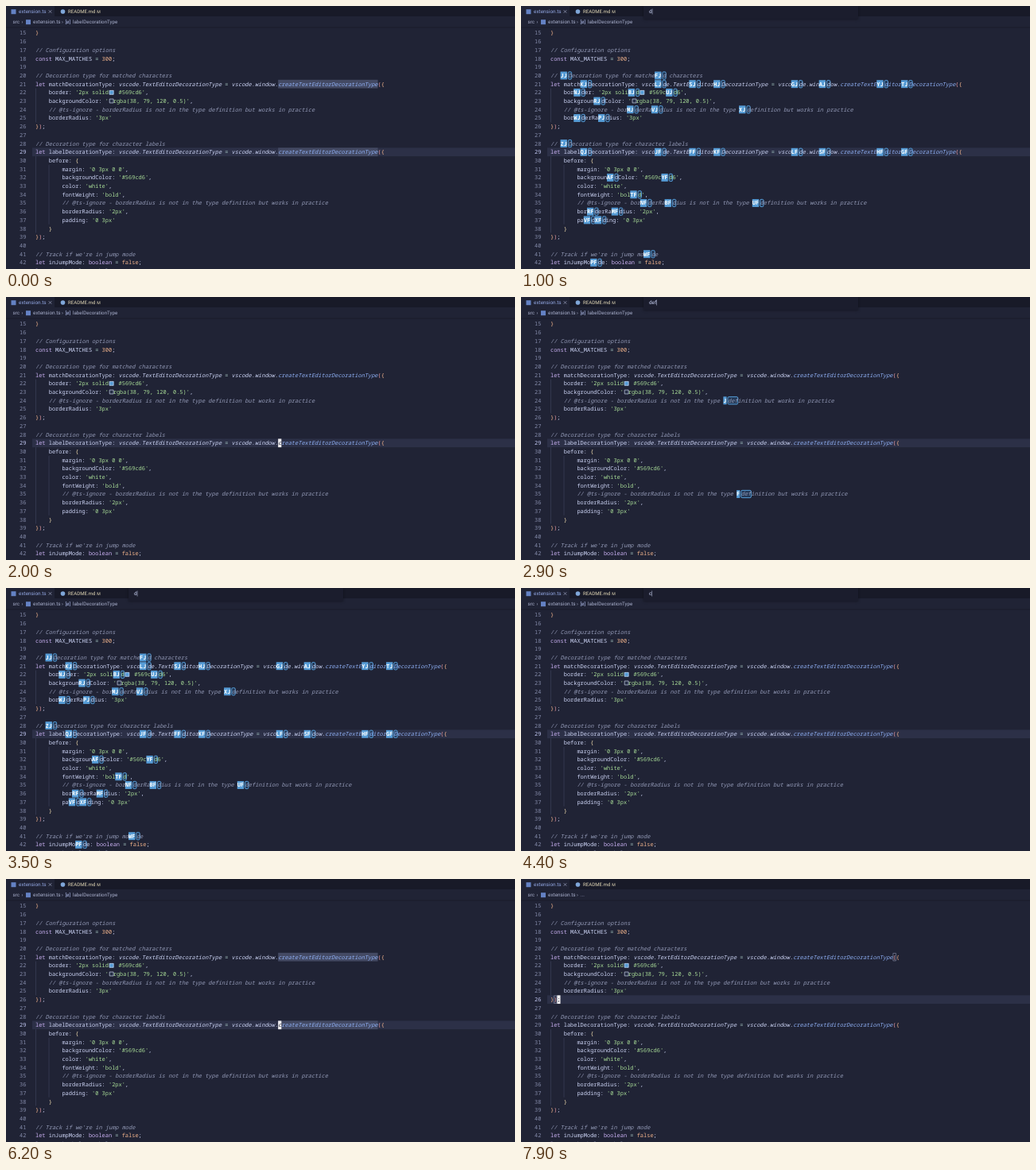
Animation, 640 px wide and 331 px high, one loop 8000 ms. Source, as an HTML page with a canvas:

```html
<!DOCTYPE html>
<html lang="en">
<head>
<meta charset="utf-8">
<title>Jump mode in a code editor</title>
<style>
  html, body { margin: 0; width: 100%; height: 100%; overflow: hidden; background: #202335; }
  canvas { display: block; width: 640px; height: 331px; }
</style>
</head>
<body>
<canvas id="stage"></canvas>
<script>
const W = 640, H = 331, LOOP = 8000;
const CELL = 4.18, ROW = 10.7, LEFT = 37, FIRST = 15, FIRST_Y = 34;
const GAP = 1.49, TABS = 13, HEADER = 26.5;
const MONO = '"Noto Sans Mono", "DejaVu Sans Mono", monospace';
const UI = 'Roboto, "Liberation Sans", sans-serif';

const color = {
  bg: '#202335', bar: '#181a28', line: '#2c3047', word: '#434963',
  guide: '#40455f', number: '#848baa', active: '#c3c9f4',
  text: '#cdd5f6', comment: '#949bb8', string: '#a8dc97', keyword: '#cbb2f4',
  type: '#eedaac', fn: '#8fb0f5', num: '#f2b48c', op: '#b4d8d2',
  round: '#ea9aa2', curly: '#f2b48c', inner: '#eedaac', label: '#569cd6'
};

const code = `}

// Configuration options
const MAX_MATCHES = 300;

// Decoration type for matched characters
let matchDecorationType: vscode.TextEditorDecorationType = vscode.window.createTextEditorDecorationType({
    border: '2px solid #569cd6',
    backgroundColor: 'rgba(38, 79, 120, 0.5)',
    // @ts-ignore - borderRadius is not in the type definition but works in practice
    borderRadius: '3px'
});

// Decoration type for character labels
let labelDecorationType: vscode.TextEditorDecorationType = vscode.window.createTextEditorDecorationType({
    before: {
        margin: '0 3px 0 0',
        backgroundColor: '#569cd6',
        color: 'white',
        fontWeight: 'bold',
        // @ts-ignore - borderRadius is not in the type definition but works in practice
        borderRadius: '2px',
        padding: '0 3px'
    }
});

// Track if we're in jump mode
let inJumpMode: boolean = false;
let matchLabels: Label[] = [];`.split('\n');

// Each rule: pattern, colour, italic
const rules = [
  [/^\/\/.*/, color.comment, true],
  [/^'[^']*'/, color.string],
  [/^(let|const|boolean)\b/, color.keyword],
  [/^createTextEditorDecorationType/, color.fn, true],
  [/^vscode\.(window\.|\w+)/, color.type, true],
  [/^(\d+|false)\b/, color.num],
  [/^(before: \{| +\}$)/, color.inner],
  [/^[()\[\]]/, color.round],
  [/^[{}]/, color.curly],
  [/^=/, color.op],
  [/^\w+|^./, color.text]
];

function tokenize(text) {
  const styles = [];
  while (styles.length < text.length) {
    const rest = text.slice(styles.length);
    const [pattern, fill, italic] = rules.find(r => r[0].test(rest));
    const token = rest.match(pattern)[0];
    const plain = fill === color.inner;
    for (const ch of token) {
      styles.push({ fill: plain && !/[{}]/.test(ch) ? color.text : fill, italic });
    }
  }
  return styles;
}
const styles = code.map(tokenize);

// Inline colour swatches by line number
const swatches = {
  22: { col: 22, room: 8.4, fill: '#569cd6' },
  23: { col: 22, room: 5.8, fill: '#242d45' }
};

const KEYS = [...'JFKDLSHGAYTNBURMVIEOCXWPZQ'];

// Letters that could continue the query are never used as labels
function findMatches(query) {
  if (!query) return [];
  const found = [], next = new Set();
  code.forEach((text, i) => {
    const low = text.toLowerCase();
    for (let c = low.indexOf(query); c >= 0; c = low.indexOf(query, c + query.length)) {
      found.push({ line: i + FIRST, col: c });
      next.add((low[c + query.length] || '').toUpperCase());
    }
  });
  const keys = KEYS.filter(k => !next.has(k)), n = keys.length;
  found.forEach((m, i) => {
    m.label = keys[i % n] + (found.length > n ? keys[Math.floor(i / n) % n] : '');
  });
  return found;
}

const base = { line: 29, col: 73, crumb: 'labelDecorationType' };
const closed = extra => ({ ...base, cursor: true, ...extra });
const prompt = (query, extra) => ({ ...base, open: true, query, ...extra });
const timeline = [
  [0, closed({ cursor: false, words: true })],
  [100, prompt('', { words: true })],
  [700, prompt('')],
  [1000, prompt('d')], [1200, prompt('de')], [1400, prompt('def')],
  [1900, closed()],
  [2300, prompt('')],
  [2700, prompt('d')], [2800, prompt('de')], [2900, prompt('def')],
  [3200, prompt('de')], [3400, prompt('d')], [3600, prompt('')],
  [4400, prompt('c', { pending: true })], [4500, prompt('c')],
  [4700, prompt('cr')], [4900, prompt('cre')], [5200, prompt('crea')], [5500, prompt('creat')],
  [5900, closed()],
  [6200, closed({ words: true })],
  [7400, closed({ line: 30, col: 12 })],
  [7500, closed()],
  [7700, closed({ line: 28, col: 37, crumb: '...' })],
  [7800, closed({ line: 27, col: 0, crumb: '...' })],
  [7900, closed({ line: 26, col: 2, crumb: '...', pair: true })]
];

const canvas = document.getElementById('stage');
const ctx = canvas.getContext('2d');
const ratio = window.devicePixelRatio || 1;
canvas.width = W * ratio;
canvas.height = H * ratio;
ctx.scale(ratio, ratio);
ctx.textRendering = 'geometricPrecision';

const rowY = line => FIRST_Y + (line - FIRST) * ROW;

function rect(x, y, w, h, fill) {
  ctx.fillStyle = fill;
  ctx.fillRect(x, y, w, h);
}
function frame(x, y, w, h, stroke, radius = 0, width = 1) {
  ctx.strokeStyle = stroke;
  ctx.lineWidth = width;
  ctx.beginPath();
  ctx.roundRect(x + width / 2, y + width / 2, w - width, h - width, radius);
  ctx.stroke();
}
function text(str, x, y, fill, font) {
  ctx.fillStyle = fill;
  ctx.font = font;
  ctx.fillText(str, x, y);
}
function mono(ch, x, y, fill, style = '') {
  text(ch, x, y + 2.4, fill, `${style} 6.97px ${MONO}`);
}
function ui(str, x, y, fill, size = 6.2) {
  text(str, x, y + 2.2, fill, `${size}px ${UI}`);
}
function cross(x, y, r) {
  ctx.strokeStyle = '#a0a7c4';
  ctx.lineWidth = 0.7;
  ctx.beginPath();
  ctx.moveTo(x - r, y - r); ctx.lineTo(x + r, y + r);
  ctx.moveTo(x + r, y - r); ctx.lineTo(x - r, y + r);
  ctx.stroke();
}
function dot(x, y, r, fill) {
  ctx.fillStyle = fill;
  ctx.beginPath();
  ctx.arc(x, y, r, 0, Math.PI * 2);
  ctx.fill();
}

function drawGuides() {
  const guide = (col, from, to) =>
    rect(LEFT + col * CELL, rowY(from) - ROW / 2, 0.6, (to - from + 1) * ROW, color.guide);
  guide(0, 22, 25);
  guide(0, 30, 38);
  guide(4, 31, 37);
}

function drawLine(index, state, matches) {
  const line = index + FIRST, y = rowY(line), top = y - ROW / 2;
  const str = code[index], swatch = swatches[line];
  const here = matches.filter(m => m.line === line);
  const current = line === state.line;
  if (current) rect(33, top, W - 33, ROW, color.line);
  [...String(line)].forEach((d, i) =>
    mono(d, 17 + i * CELL, y, current ? color.active : color.number));

  const word = state.words ? str.indexOf('createText') : -1;
  if (word >= 0) rect(LEFT + word * CELL, top, 30 * CELL, ROW, color.word);

  let x = LEFT;
  for (let col = 0; col < Math.max(str.length, 1); col++) {
    const hit = here.find(m => m.col === col);
    if (hit) {
      const w = hit.label.length * CELL;
      rect(x, top + 0.4, w, ROW - 0.8, color.label);
      [...hit.label].forEach((ch, i) => mono(ch, x + i * CELL, y, '#fff', 'bold'));
      x += w + GAP;
      const span = state.query.length * CELL;
      rect(x, top + 0.4, span, ROW - 0.8, 'rgba(38,79,120,0.5)');
      frame(x - 0.6, top + 0.2, span + 1.2, ROW - 0.4, color.label, 1.5);
    }
    if (swatch && swatch.col === col) {
      rect(x + 0.9, y - 2.9, 5.6, 5.6, swatch.fill);
      frame(x + 0.9, y - 2.9, 5.6, 5.6, '#c9d0e4', 0, 0.7);
      x += swatch.room;
    }
    const block = current && state.cursor && col === state.col;
    if (block) rect(x, top, CELL, ROW, '#f0eef0');
    const paired = state.pair && (line === 21 && col === 103 || line === 26 && col === 1);
    if (paired) frame(x, top + 0.3, CELL, ROW - 0.6, '#8c93ad', 0, 0.6);
    if (str[col] && str[col] !== ' ') {
      const s = styles[index][col];
      mono(str[col], x, y, block ? color.bg : s.fill, s.italic ? 'italic' : '');
    }
    x += CELL;
  }
}

function drawHeader(state) {
  rect(0, 0, W, TABS, color.bar);
  rect(0, 0, 61, TABS, color.bg);
  rect(6.5, 4.2, 6, 6, '#6482c4');
  ui('extension.ts', 16, 7, '#93a8e4', 6.4);
  cross(55.5, 7, 1.8);
  dot(71.5, 7, 2.8, '#7fa6d8');
  ui('README.md', 78, 7, '#e6dcba', 6.1);
  ui('M', 114.3, 7, '#e6dcba', 5.2);

  rect(0, TABS, W, HEADER - TABS, color.bg);
  rect(0, HEADER, W, 1, '#1a1c2b');
  const dim = '#a9b0cd';
  ui('src', 8.5, 20, dim);
  ui('›', 19.5, 20, dim);
  rect(25, 17.2, 6, 6, '#6482c4');
  ui('extension.ts', 34, 20, dim, 6.4);
  ui('›', 70, 20, dim);
  if (state.crumb === '...') {
    ui('...', 75, 20, dim);
  } else {
    ui('[ø]', 74.5, 20, '#b4c2f0', 6);
    ui(state.crumb, 84, 20, dim);
  }
}

function drawPrompt(query) {
  ctx.save();
  ctx.shadowColor = 'rgba(0,0,0,0.35)';
  ctx.shadowBlur = 3 * ratio;
  rect(154, 0, 270, 16.5, '#1b1d2d');
  ctx.restore();
  ui(query, 161, 7, '#cdd5f6', 6.4);
  rect(161.2 + ctx.measureText(query).width, 3.5, 0.5, 7, '#cdd5f6');
}

function draw(state) {
  rect(0, 0, W, H, color.bg);
  const matches = state.open && !state.pending ? findMatches(state.query) : [];
  code.forEach((_, i) => drawLine(i, state, matches));
  drawGuides();
  drawHeader(state);
  if (state.open) drawPrompt(state.query);
}

const start = performance.now();
let shown = null;
function tick() {
  const t = (performance.now() - start) % LOOP;
  const state = timeline.filter(([at]) => at <= t).pop()[1];
  if (state !== shown) draw(shown = state);
  requestAnimationFrame(tick);
}
tick();
</script>
</body>
</html>
```
